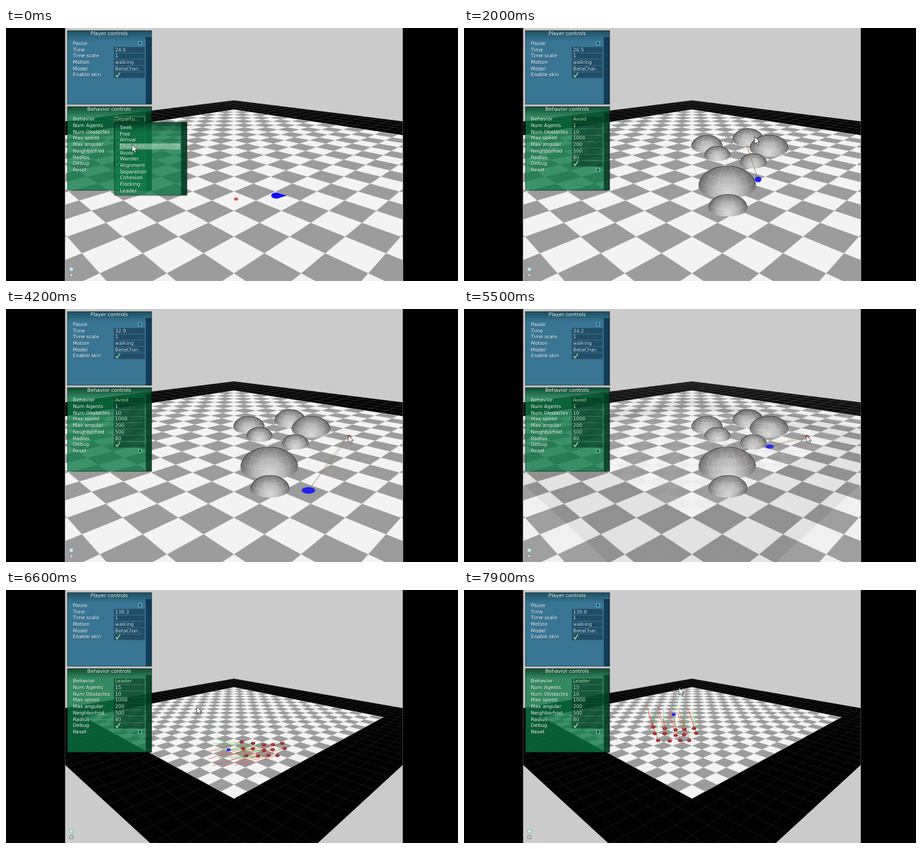
An HTML page with a canvas for the animation above (8000 ms loop, 692 by 388 pixels).

```html
<!DOCTYPE html>
<html lang="en">
<head>
<meta charset="utf-8">
<title>Steering behaviors</title>
<style>
html, body { margin: 0; width: 100%; height: 100%; overflow: hidden; background: #000; }
canvas { display: block; width: 692px; height: 388px; }
</style>
</head>
<body>
<canvas id="stage" width="692" height="388"></canvas>
<script>
const W = 692, H = 388, LOOP = 8000, CX = 349;
const LEFT = 90.5, RIGHT = 607.5;
const TILES = 20, BORDER = 1.475;
const FONT = '"DejaVu Sans", sans-serif';

function layer() {
  const c = document.createElement('canvas');
  c.width = W;
  c.height = H;
  return c;
}

// Repeatable noise in -1..1.
function noise(n) {
  const s = Math.sin(n * 127.1 + 3.7) * 43758.5453;
  return (s - Math.floor(s)) * 2 - 1;
}

// Smooth path through [time, x, y] points.
function along(keys, t) {
  const last = keys.length - 1;
  if (t <= keys[0][0]) return keys[0].slice(1);
  if (t >= keys[last][0]) return keys[last].slice(1);
  let i = 0;
  while (t >= keys[i + 1][0]) i++;
  const a = keys[i], b = keys[i + 1], span = b[0] - a[0];
  const u = (t - a[0]) / span, v = 1 - u;
  const slope = (n, d) => {
    if (n === 0 || n === last) return 0;
    const p = keys[n - 1], q = keys[n + 1];
    return (q[d] - p[d]) / (q[0] - p[0]);
  };
  return [1, 2].map(d =>
    a[d] * (1 + 2 * u) * v * v + b[d] * u * u * (3 - 2 * u) +
    span * (slope(i, d) * u * v * v - slope(i + 1, d) * u * u * v));
}

function poly(g, pts, fill) {
  g.beginPath();
  pts.forEach(p => g.lineTo(p[0], p[1]));
  g.closePath();
  g.fillStyle = fill;
  g.fill();
}

function line(g, a, b, color, width = 0.7) {
  g.beginPath();
  g.moveTo(a[0], a[1]);
  g.lineTo(b[0], b[1]);
  g.strokeStyle = color;
  g.lineWidth = width;
  g.stroke();
}

/* ---------- floor ---------- */

// The camera looks at the middle of the floor; zoom brings it closer.
function makeFloor(zoom, gridAlpha) {
  const c = layer(), g = c.getContext('2d');
  const tilt = 0.462 * zoom, wide = 229 * zoom, step = 2 / TILES;
  const depth = (a, b) => 1 + tilt * (a + b) / 2;
  const P = (a, b) => {
    const w = depth(a, b);
    return [CX + wide * (a - b) / 2 / w, 49.4 + 145.6 / w];
  };
  const slab = (k, fill) => {
    const pts = [P(k, k), P(k, -k)];
    if (depth(-k, -k) > 0) pts.push(P(-k, -k));
    poly(g, [...pts, P(-k, k)], fill);
  };

  g.beginPath();
  g.rect(LEFT, 0, RIGHT - LEFT, H);
  g.clip();
  g.fillStyle = '#cbcbcb';
  g.fillRect(0, 0, W, H);

  slab(BORDER, '#020202');
  const color = `rgba(255,255,255,${gridAlpha})`;
  for (let e = -1.4; e < BORDER; e += step) {
    const near = Math.max(-BORDER, -1.6 / tilt - e);
    line(g, P(e, BORDER), P(e, near), color, 0.6);
    line(g, P(BORDER, e), P(near, e), color, 0.6);
  }

  slab(1, '#f3f3f3');
  for (let i = 0; i < TILES; i++) {
    for (let j = 0; j < TILES; j++) {
      if ((i + j) % 2 === 0) continue;
      const a = 1 - i * step, b = 1 - j * step;
      poly(g, [P(a, b), P(a - step, b), P(a - step, b - step), P(a, b - step)], '#9c9c9c');
    }
  }
  return c;
}

const closeFloor = makeFloor(2, 0.2);
const farFloor = makeFloor(1, 0.12);

/* ---------- obstacles ---------- */

// [x, y, radius], far to near
const DOMES = [[435, 171.5, 24], [372, 181.5, 24], [467, 185, 29.5], [388, 195.5, 20],
  [443, 207, 20.5], [403, 243, 44], [404, 276.5, 30]];

function dome(g, [x, y, r]) {
  const up = r * 0.72, down = r * 0.42;
  const arc = (rx, ry, from, to) => g.ellipse(x, y, rx, ry, 0, from * Math.PI, to * Math.PI);

  const shade = g.createRadialGradient(x, y + down * 0.6, 0, x, y + down * 0.6, r * 1.05);
  shade.addColorStop(0, '#dadada');
  shade.addColorStop(0.5, '#b6b6b6');
  shade.addColorStop(1, '#6c6c6c');
  g.beginPath();
  arc(r, up, 1, 2);
  arc(r, down, 0, 1);
  g.fillStyle = shade;
  g.fill();

  g.lineWidth = 0.5;
  g.strokeStyle = 'rgba(240,240,240,.4)';
  for (const f of [0.3, 0.68]) {
    g.beginPath();
    arc(r * f, up, 1, 2);
    g.stroke();
    const s = Math.sqrt(1 - f * f);
    g.beginPath();
    g.ellipse(x, y - up * f, r * s, down * 0.7 * s, 0, 0, Math.PI);
    g.stroke();
  }
  g.beginPath();
  arc(r - 0.4, up - 0.4, 1.03, 1.97);
  g.strokeStyle = 'rgba(30,30,30,.75)';
  g.lineWidth = 0.9;
  g.stroke();
}

const domes = layer();
DOMES.forEach(d => dome(domes.getContext('2d'), d));

/* ---------- panels ---------- */

function text(g, s, x, y, color = '#f4f8f8', size = 7.5, align = 'left') {
  g.font = size + 'px ' + FONT;
  g.textAlign = align;
  g.textBaseline = 'middle';
  g.fillStyle = 'rgba(0,0,0,.4)';
  g.fillText(s, x + 0.6, y + 1);
  g.fillStyle = color;
  g.fillText(s, x, y + 0.4);
}

function check(g, x, y) {
  g.beginPath();
  g.moveTo(x - 3, y);
  g.lineTo(x - 1, y + 3);
  g.lineTo(x + 3.5, y - 3.5);
  g.strokeStyle = '#b6f0a4';
  g.lineWidth = 1.3;
  g.stroke();
}

function box(g, x, y, color, fill) {
  g.fillStyle = fill;
  g.fillRect(x - 3, y - 3, 6, 6);
  g.strokeStyle = color;
  g.lineWidth = 1;
  g.strokeRect(x - 2.5, y - 2.5, 5, 5);
}

function frame(g, x, y, w, h, skin, stripTop) {
  const fill = g.createLinearGradient(0, y, 0, y + 16);
  fill.addColorStop(0, skin.top);
  fill.addColorStop(1, skin.fill);
  g.fillStyle = fill;
  g.fillRect(x, y, w, h);
  g.fillStyle = skin.strip;
  g.fillRect(x + w - 9, y + stripTop, 9, h - stripTop);
  g.strokeStyle = 'rgba(0,0,0,.35)';
  g.lineWidth = 1.4;
  g.strokeRect(x, y, w, h);
}

function panel(g, skin, title, y, h, rows) {
  frame(g, 94, y, 129, h, skin, 10);
  text(g, title, 158, y + 4.6, '#f4f8f8', 7.7, 'center');
  rows.forEach(([label, value], i) => {
    const ry = y + 19.5 + i * 9.7;
    text(g, label, 102.5, ry);
    if (value === '[]') return box(g, 205, ry, skin.mark, skin.field);
    g.fillStyle = skin.field;
    g.fillRect(165, ry - 4.2, 47.5, 8.8);
    if (value === 'on') check(g, 171, ry);
    else text(g, value, 167, ry, label === 'Behavior' ? '#a9eea0' : skin.ink);
  });
}

const BLUE = {
  top: 'rgba(14,68,84,.92)', fill: 'rgba(20,96,134,.8)', strip: 'rgba(4,36,62,.7)',
  field: 'rgba(16,44,62,.55)', ink: '#c6e2f4', mark: '#6cc4dc'
};
const GREEN = {
  top: 'rgba(2,62,36,.92)', fill: 'rgba(8,120,68,.78)', strip: 'rgba(0,44,24,.7)',
  field: 'rgba(6,48,30,.58)', ink: '#cdeedd', mark: '#72d8ae'
};
const MENU = ['Seek', 'Flee', 'Arrival', 'Departure', 'Avoid', 'Wander', 'Alignment',
  'Separation', 'Cohesion', 'Flocking', 'Leader'];

function panels(g, clock, behavior, agents) {
  panel(g, BLUE, 'Player controls', 4, 113, [
    ['Pause', '[]'], ['Time', (Math.floor(clock * 10 + 1e-6) / 10).toFixed(1)],
    ['Time scale', '1'], ['Motion', 'walking'], ['Model', 'BetaChar..'], ['Enable skin', 'on']]);
  panel(g, GREEN, 'Behavior controls', 120.5, 128.5, [
    ['Behavior', behavior], ['Num Agents', agents], ['Num Obstacles', '10'],
    ['Max speed', '1000'], ['Max angular', '200'], ['Neighborhod', '500'], ['Radius', '80'],
    ['Debug', 'on'], ['Reset', '[]']]);
  box(g, 100, 370, '#7fbcc0', '#d4eeee');
  box(g, 100, 379, '#8a8a8a', '#c8c8c8');
}

function menu(g, cursorY) {
  g.strokeStyle = 'rgba(190,230,205,.5)';
  g.lineWidth = 0.8;
  g.strokeRect(165.5, 136, 47, 8.5);
  frame(g, 166, 144.5, 111, 112, GREEN, 0);
  const hover = Math.floor((cursorY - 147) / 9.7);
  MENU.forEach((name, i) => {
    const y = 152.5 + i * 9.7;
    if (i === hover) {
      g.fillStyle = 'rgba(205,232,214,.5)';
      g.fillRect(174, y - 4.6, 93, 9.2);
    }
    text(g, name, 174.5, y, i === hover ? '#c4dfcd' : '#f2f8f4');
  });
}

function pointer(g, [x, y]) {
  const shape = [[0, 0], [0, 11], [2.6, 8.6], [4.4, 12.4], [6.2, 11.5], [4.5, 7.9], [8, 7.7]];
  poly(g, shape.map(([a, b]) => [x + a, y + b]), '#fff');
  g.strokeStyle = '#222';
  g.lineWidth = 0.8;
  g.stroke();
}

/* ---------- agents ---------- */

function blob(g, [x, y], rx, ry, color) {
  g.beginPath();
  g.ellipse(x, y, rx, ry, 0, 0, Math.PI * 2);
  g.fillStyle = color;
  g.fill();
}

function goalMark(g, [x, y]) {
  poly(g, [[x - 3, y + 2], [x - 2, y - 2], [x + 2, y - 2], [x + 4, y + 1], [x, y + 3]], '#d8505a');
}

function feelers(g, from, to) {
  line(g, from, [to[0], to[1] + 2], 'rgba(230,70,60,.7)');
  line(g, from, [to[0] - 2, to[1] - 1], 'rgba(60,170,70,.7)');
}

const cursorA = [[0, 193, 179], [380, 190, 188], [1100, 314, 210], [1650, 428, 180], [3000, 448, 142]];
const agentA = [[0, 417, 257], [1100, 426, 259], [1600, 451, 248], [2200, 446, 224], [3000, 417, 194]];
const cursorB = [[2900, 431, 337], [3600, 524, 194]];
const agentB = [[2900, 440, 273], [4100, 462, 281], [5500, 468, 211], [5950, 482, 207]];
const cursorC = [[5900, 305, 266], [6600, 292, 179], [7900, 329, 150]];
const leaderC = [[5400, 418, 236], [5900, 394, 246], [6600, 341, 245], [7900, 321, 191]];
const flockC = [[5400, 418, 215], [5900, 414, 224], [6600, 396, 244], [7900, 325, 221]];
// Heading in radians and feeler length
const headingC = [[5900, 1.5, 40], [6600, 2.85, 54], [7900, 4.42, 35]];

const FOLLOWERS = 14, COLUMNS = 5;

function followers([cx, cy]) {
  return Array.from({ length: FOLLOWERS }, (_, n) => {
    const col = n % COLUMNS - 2, row = Math.floor(n / COLUMNS) - 1;
    return [cx + col * 15 + row * 3 + noise(n) * 3, cy + row * 8.5 + noise(n + 50) * 2.5];
  });
}

function ray(g, [x, y], angle, length, color) {
  line(g, [x, y], [x + Math.cos(angle) * length, y + Math.sin(angle) * length], color);
}

/* ---------- clips ---------- */

function clipA(g, t) {
  const open = t < 450, early = t < 1550;
  const cursor = along(cursorA, t), a = along(agentA, t);
  const goal = early ? [352, 262] : [434, 180];
  g.drawImage(closeFloor, 0, 0);
  goalMark(g, goal);
  if (!open) {
    g.drawImage(domes, 0, 0);
    if (early) {
      line(g, [335, 242], [363, 248], 'rgba(90,190,100,.7)');
      line(g, [363, 278], [376, 273], 'rgba(225,70,80,.7)');
    } else {
      feelers(g, a, goal);
    }
  }
  if (t < 900) {
    blob(g, [a[0] - 4, a[1]], 7, 4.5, '#1010f0');
    poly(g, [[a[0] - 3, a[1] - 5], [a[0] + 13, a[1]], [a[0] - 3, a[1] + 5]], '#1010f0');
  } else {
    const size = 0.6 + (a[1] - 194) / 160;
    blob(g, a, 6 * Math.max(0.75, size), 5 * size, '#2020f0');
  }
  panels(g, 24.62 + t * 0.00097, open ? 'Departu..' : 'Avoid', '1');
  if (open) menu(g, cursor[1]);
  pointer(g, cursor);
}

function clipB(g, t) {
  const a = along(agentB, t), goal = t < 3600 ? [430, 343] : [525, 195];
  g.drawImage(closeFloor, 0, 0);
  goalMark(g, goal);
  g.drawImage(domes, 0, 0);
  feelers(g, a, goal);
  const size = (a[1] - 100) / 111;
  blob(g, a, 6.5 * size, 3.2 * size, '#2424ee');
  panels(g, 31.75 + (t - 3000) / 1000, 'Avoid', '1');
  pointer(g, along(cursorB, t));
}

function clipC(g, t) {
  const lead = along(leaderC, t), cursor = along(cursorC, t);
  const [angle, reach] = along(headingC, t);
  const spots = followers(along(flockC, t));
  g.drawImage(farFloor, 0, 0);
  for (const p of spots) {
    ray(g, p, angle + 0.22, reach * 0.8, 'rgba(50,215,70,.75)');
    ray(g, p, angle, reach, 'rgba(235,50,50,.8)');
  }
  if (t < 6200) line(g, lead, [312, 279], 'rgba(220,50,45,.9)', 0.9);
  else line(g, lead, [cursor[0] + 2, cursor[1] + 6], `rgba(60,215,80,${0.2 + (t - 6200) / 2800})`);
  for (const p of spots) {
    blob(g, p, 3.3, 2.4, '#9c2830');
    blob(g, [p[0] - 0.6, p[1] - 0.6], 1.6, 1, '#c8484c');
  }
  blob(g, lead, 3.3, 2.3, '#2c2ce8');
  panels(g, 137.65 + (t - 5900) / 1000, 'Leader', '15');
  pointer(g, cursor);
}

const stage = document.getElementById('stage').getContext('2d');
const overlay = layer(), over = overlay.getContext('2d');
const CLIPS = [[0, clipA], [2920, clipB], [5470, clipC]];
const FADE = 480;

function draw(t) {
  let i = CLIPS.length - 1;
  while (t < CLIPS[i][0]) i--;
  const [begin, clip] = CLIPS[i], mix = (t - begin) / FADE;
  stage.fillStyle = '#000';
  stage.fillRect(0, 0, W, H);
  if (i === 0 || mix >= 1) return clip(stage, t);

  CLIPS[i - 1][1](stage, t);
  over.fillStyle = '#000';
  over.fillRect(0, 0, W, H);
  clip(over, t);
  stage.globalAlpha = mix;
  stage.drawImage(overlay, 0, 0);
  stage.globalAlpha = 1;
}

const start = performance.now();
function tick() {
  draw((performance.now() - start) % LOOP);
  requestAnimationFrame(tick);
}
tick();
</script>
</body>
</html>
```
